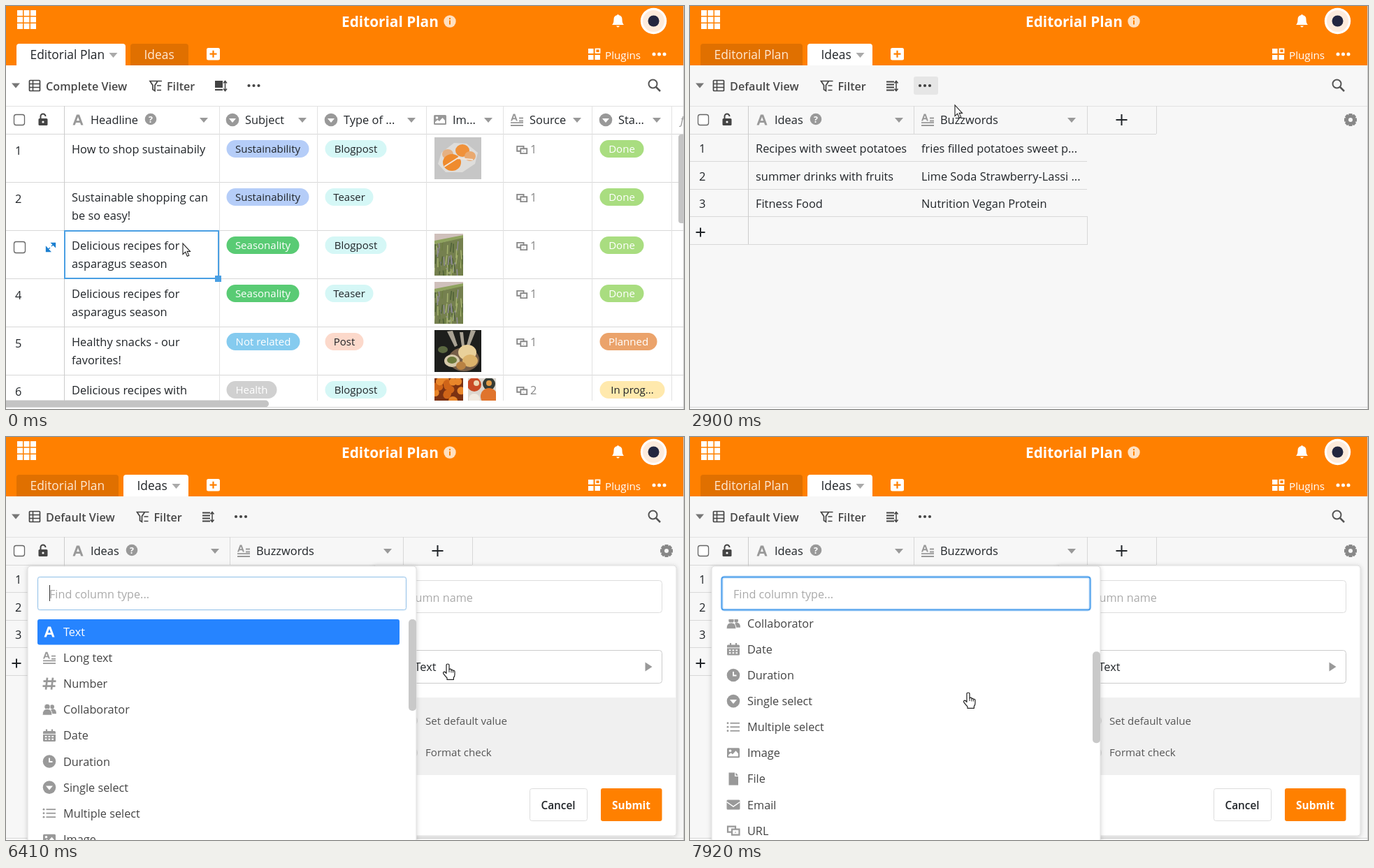
Recreate the animation shown at these times as an HTML page. Size 970 by 577 pixels, loop 8 s.

```html
<!DOCTYPE html>
<html lang="en">
<head>
<meta charset="utf-8">
<title>Editorial Plan</title>
<style>
html, body { margin: 0; width: 100%; height: 100%; overflow: hidden; background: #fff; }
svg { display: block; }
#stage { width: 970px; height: 577px; font-family: "Open Sans", "Noto Sans", sans-serif; }
</style>
</head>
<body>
<script>
const LOOP = 8000, INK = '#212529', GREY = '#999', LINE = '#d8d8d8', ORANGE = '#ff8000';

// Drawing helpers, each returning SVG markup
const text = (x, y, s, size = 16.4, fill = INK, attrs = '') =>
  `<text x="${x}" y="${y}" font-size="${size}" fill="${fill}" ${attrs}>${s}</text>`;
const rect = (x, y, w, h, fill, r = 0, attrs = '') =>
  `<rect x="${x}" y="${y}" width="${w}" height="${h}" fill="${fill}" rx="${r}" ${attrs}/>`;
const box = (x, y, w, h, stroke, r = 0, fill = 'none', width = 1) =>
  rect(x + .5, y + .5, w, h, fill, r, `stroke="${stroke}" stroke-width="${width}"`);
const circle = (x, y, r, fill) => `<circle cx="${x}" cy="${y}" r="${r}" fill="${fill}"/>`;
const oval = (x, y, rx, ry, fill) => `<ellipse cx="${x}" cy="${y}" rx="${rx}" ry="${ry}" fill="${fill}"/>`;
const path = (d, fill = 'none', attrs = '') => `<path d="${d}" fill="${fill}" ${attrs}/>`;
const stroke = (d, color, width = 1, attrs = '') =>
  path(d, 'none', `stroke="${color}" stroke-width="${width}" ${attrs}`);
const hline = (x, y, w, c = LINE) => rect(x, y, w, 1, c);
const vline = (x, y, h, c = LINE) => rect(x, y, 1, h, c);
const group = (id, body, attrs = '') => `<g id="${id}" ${attrs}>${body}</g>`;
const caret = (x, y, c = GREY) => path(`M${x - 6} ${y - 3.5}h12l-6 7z`, c);
const dots = (x, y, c, r, gap) => [-gap, 0, gap].map(d => circle(x + d, y, r, c)).join('');
const plus = (x, y, r, c, w) => stroke(`M${x - r} ${y}h${2 * r}M${x} ${y - r}v${2 * r}`, c, w);
const times = (n, f) => Array.from({ length: n }, (_, i) => f(i)).join('');
const random = n => Math.abs(Math.sin(n * 12.9898) * 43758.5453) % 1;
const letterA = 'M-7.5 7.5-2-7.5h4l5.5 15h-3.2L3 4h-6l-1.3 3.5zM-2 1.3h4L0-4.2z';

const icons = {
  text: c => path(letterA, c, 'fill-rule="evenodd"'),
  long: c => path(letterA, c, 'fill-rule="evenodd" transform="translate(-4,-3.5) scale(.66)"') +
    stroke('M3-2.5h6M3 1.5h6M-9 4.2H9M-9 8H9', c, 1.8),
  number: c => stroke('M-3-8.5-5 8.5M5-8.5 3 8.5M-8.5-3.5h18M-9.5 3.5h18', c, 2.7),
  people: c => circle(4, -4, 3, c) + path('M1 6q0-7 4-7 5 0 5 7z', c) +
    `<g stroke="#fff" stroke-width="1">${circle(-3, -4, 4.2, c)}${path('M-10 8q0-9 7-9t7 9z', c)}</g>`,
  date: c => rect(-9, -6.5, 18, 15, c, 1.5) + stroke('M-4-9v4M4-9v4', c, 2.2) + hline(-9, -2.5, 18, '#fff') +
    times(6, i => rect(-6.2 + i % 3 * 4.8, .5 + (i > 2) * 3.8, 2.6, 2, '#fff')),
  clock: c => circle(0, 0, 9.3, c) + stroke('M0-5v5.5h4.5', '#fff', 1.8),
  select: c => circle(0, 0, 9.3, c) + path('M-5-2H5L0 4z', '#fff'),
  multi: c => times(3, i => circle(-8, i * 5.5 - 5.5, 1.4, c) + rect(-4.5, i * 5.5 - 6.4, 13.5, 1.8, c)),
  image: c => rect(-9, -7, 18, 14, c, 1.5) + circle(-4.5, -3, 1.8, '#fff') +
    path('M-7 5v-2l3.5-3 2.5 2L3.5-3 7 1v4z', '#fff'),
  file: c => path('M-6.5-9H2v5.5h5V9H-6.5z', c) + path('M3.3-9v4.3H7z', c),
  email: c => rect(-9.5, -7, 19, 14, c, 1.5) + stroke('M-9.5-4 0 2.5 9.5-4', '#fff', 1.5),
  link: c => stroke('M-3 2h-5v-8H3v3M8.5-2H-2v8H8.5zM3 2v1', c, 2.2)
};
const icon = (name, x, y, c = GREY, scale = 1) =>
  `<g transform="translate(${x},${y}) scale(${scale})">${icons[name](c)}</g>`;

const checkbox = (x, y, s = 15) => box(x, y, s, s, '#666', 3, '#fff', 1.3);
const help = (x, y) => circle(x, y, 8.3, GREY) +
  text(x, y + 4.5, '?', 12.5, '#fff', 'text-anchor="middle" font-weight="700"');
const lock = rect(46.5, 161, 13, 10, '#444', 1.5) + circle(53, 166, 1.6, '#fff') +
  stroke('M49.5 161v-3a3.5 3.5 0 0 1 7 0', '#444', 2);
const pill = (x, y, w, s, fill, color = INK) => rect(x, y, w, 25, fill, 12.5) +
  text(x + w / 2, y + 18, s, 15, color, 'text-anchor="middle"');

// Parts shared by both tables
function chrome() {
  return rect(0, 0, 970, 85, ORANGE) +
    times(9, i => rect(16 + i % 3 * 9.5, 6 + (i / 3 | 0) * 9.5, 8, 8, '#fff')) +
    text(480, 30, 'Editorial Plan', 20.8, '#fff', 'font-weight="700"') +
    circle(635, 22, 8.7, '#ffe0c0') + rect(634, 20.5, 2, 6, ORANGE) + circle(635, 18, 1.2, ORANGE) +
    path('M867 27q2.5-2 2.5-8 0-5 5-6 1-2.5 2 0 5 1 5 6 0 6 2.5 8zM873 28.5h5q-2.5 4-5 0z', '#fff') +
    circle(926.5, 21.5, 18.7, '#fff') + circle(926.5, 21.5, 15.5, '#fdebdc') + circle(926.5, 21.5, 8, '#23263f') +
    rect(287, 60, 19, 17.5, '#fff', 2.5) + plus(296.5, 68.7, 5, ORANGE, 2.2) +
    rect(833, 61, 7.5, 7, '#fff') + rect(833, 70, 7.5, 7, '#fff') + rect(842.5, 70, 7.5, 7, '#fff') +
    box(843, 61, 6, 5.5, '#fff', 0, 'none', 1.8) +
    text(857, 76, 'Plugins', 15.2, '#fff') + dots(934.5, 69, '#fff', 2.5, 7.5);
}

const windowEdge = hline(0, 574, 970, '#d5d5d5') + rect(0, 575, 970, 2, '#fff') + vline(969, 0, 577, '#c8c8c8');

function toolbar(view, dx, bg) {
  const x = 206 + dx;
  return rect(0, 85, 970, 492, bg) + caret(14, 114, '#777') +
    box(33, 106, 15, 15, '#444', 1, 'none', 1.7) + stroke('M33 111.5h16M33 116.5h16M38.5 106v16', '#444', 1.5) +
    text(57, 121, view, 16.2, '#484848', 'font-weight="600"') +
    stroke(`M${x} 107.5h11l-4 6v8l-3-2v-6zM${x + 12} 107.5h5M${x + 10} 114h6M${x + 10} 120.5h6`, '#444', 1.7) +
    text(x + 24, 121, 'Filter', 16.2, '#484848', 'font-weight="600"') +
    stroke(`M${x + 107.5} 108v13m-2.5-10.5 2.5-3 2.5 3m-5 8 2.5 3 2.5-3`, '#444', 1.5) +
    dots(x + 148.5, 114, '#444', 2.1, 7) +
    `<circle cx="925.5" cy="111.5" r="6" fill="none" stroke="#555" stroke-width="2"/>` +
    stroke('M930 116l6 6', '#555', 2.5) +
    hline(0, 143, 970, '#e2e2e2') + checkbox(11, 155) + lock;
}

const tabShape = (x, w, fill, attrs) => path(`M${x} 85V58q0-4 4-4h${w - 8}q4 0 4 4v27z`, fill, attrs);
const activeTab = (x, w, s) => tabShape(x, w, '#fff') +
  text(x + 19.5, 76, s, 17.4) + caret(x + w - 17.5, 70.5, '#aaa');
const idleTab = (x, w, s, id) => tabShape(x, w, '#e07000', `id="${id}"`) +
  text(x + 19.5, 76, s, 17.4, '#ffe9d2');

// Simplified food photos
const photo = (x, y, w, h, bg, body) =>
  `<svg x="${x}" y="${y}" width="${w}" height="${h}">${rect(0, 0, w, h, bg)}${body}</svg>`;
const fruit = (x, y) => photo(x, y, 67, 60, '#c6c6c6',
  path('M10 22 28 8 46 9 62 22 58 38 40 50 16 50 5 38z', '#dedddb') +
  oval(19, 24, 8, 7, '#e5b183') + oval(25, 36, 13, 12, '#ef8b2e') +
  oval(40, 19, 10, 9, '#f0913a') + oval(51, 27, 8, 7, '#e9a970') + stroke('M14 42l22-14M33 30l22 2', '#f3e6da', 2));
const asparagus = (x, y) => photo(x, y, 41, 60, '#75804f',
  times(60, i => {
    const tint = ['#a3b06e', '#4f6138', '#8d8a93', '#6d7d42'][i % 4];
    return stroke(`M${random(i + 1) * 41} ${8 + random(i + 70) * 45}l${random(i + 140) * 4 - 2} 13`, tint, 1.6);
  }) + path('M0 0h41v5L0 15z', '#cfc0bb') + path('M0 10 41 2v4L0 15z', '#8fa35f'));
const bowl = (x, y) => photo(x, y, 67, 60, '#1d1e1c',
  path('M18 2l11 22 4-2L26 1zM36 3l3 20h4L41 3zM52 0l-6 22 4 1 9-22z', '#a9a294') +
  oval(42, 42, 22, 17, '#775f49') + oval(25, 44, 11, 9, '#d6c9ab') + oval(25, 43, 7, 5, '#6d7a3c') +
  oval(47, 32, 13, 11, '#e9d09a') + oval(51, 44, 11, 9, '#dcb36c') + oval(38, 51, 7, 6, '#b98243') +
  oval(12, 28, 7, 5, '#5a6740'));
const nuggets = (x, y) => photo(x, y, 41, 44, '#7c3212',
  times(16, i => circle(random(i + 3) * 41, random(i + 40) * 40, 5.5, i % 2 ? '#e9862a' : '#cf6418')));
const platter = (x, y) => photo(x, y, 40, 44, '#dcd6ce',
  circle(9, 9, 10, '#c94a25') + circle(30, 8, 9, '#353b35') + circle(30, 26, 12, '#e0742c') +
  circle(9, 30, 8, '#f0eae0') + circle(30, 7, 4, '#e39b45') + circle(12, 7, 4, '#ecd6b4'));

function planTable() {
  const SKY = '#d5f7f6';
  const topics = {
    Sustainability: [118, '#b5cdf8'], Seasonality: [104, '#59cb74', '#fff'],
    'Not related': [105, '#85cbef', '#fff'], Health: [72, '#d0d0d0', '#fff'],
    Blogpost: [88, SKY], Teaser: [69, SKY], Post: [55, '#fcd9cb'],
    Done: [63, '#a9dd80', '#fff'], Planned: [82, '#eba36b', '#fff'], 'In prog...': [93, '#ffe9ad']
  };
  const tag = (x, y, name) => pill(x, y, topics[name][0], name, ...topics[name].slice(1));
  const recipes = ['Delicious recipes for', 'asparagus season'];
  const rows = [
    [['How to shop sustainabily'], 'Sustainability', 'Blogpost', 1, 'Done', y => fruit(613, y)],
    [['Sustainable shopping can', 'be so easy!'], 'Sustainability', 'Teaser', 1, 'Done', () => ''],
    [recipes, 'Seasonality', 'Blogpost', 1, 'Done', y => asparagus(613, y)],
    [recipes, 'Seasonality', 'Teaser', 1, 'Done', y => asparagus(613, y)],
    [['Healthy snacks - our', 'favorites!'], 'Not related', 'Post', 1, 'Planned', y => bowl(613, y)],
    [['Delicious recipes with'], 'Health', 'Blogpost', 2, 'In prog...', y => nuggets(613, y) + platter(661, y)]
  ];
  const heads = [
    ['text', 103, 'Headline', 283], ['select', 324, 'Subject', 424], ['select', 465, 'Type of ...', 580],
    ['image', 621, 'Im...', 690], ['long', 731, 'Source', 817], ['select', 858, 'Sta...', 931]
  ];
  return toolbar('Complete View', 0, '#fff') + rect(299, 107, 11, 10, '#444') + rect(299, 119, 11, 2, '#444') +
    group('filterHover', rect(198, 101, 80, 27, '#000', 3, 'opacity=".07"')) +
    activeTab(15, 156, 'Editorial Plan') + idleTab(178, 83, 'Ideas', 'ideasTab') +
    heads.map(([kind, x, s, end]) => icon(kind, x, 163) + text(x + 18, 169, s) + caret(end, 163.5)).join('') +
    help(207, 162) + text(963, 169, 'ƒ', 17, GREY, 'font-style="italic"') +
    times(6, i => hline(0, 183 + i * 69, 970)) +
    [83, 305, 445, 601, 711, 838, 952].map((x, i) => vline(x, 143, 434, i ? '#e2e2e2' : '#ccc')).join('') +
    rows.map(([lines, subject, type, count, status, photos], i) => {
      const y = 183 + i * 69;
      return text(13, y + 30, i + 1) + lines.map((s, n) => text(94, y + 28 + n * 26, s)).join('') +
        tag(315.5, y + 9, subject) + tag(456.5, y + 9, type) + tag(849.5, y + 9, status) +
        icon('link', 738, y + 23, '#888', .85) + text(750, y + 28, count, 16.4, '#888') + photos(y + 5);
    }).join('') +
    group('rowHover', rect(8, 188, 70, 55, '#fff') + checkbox(11, 199, 16) +
      path('M65 206l5-5M65 201.5h5.5v5.5zM63 208l-5 5M57.5 207v6.5h6z', '#1b7fd0', 'stroke="#1b7fd0" stroke-width="1.3"')) +
    box(83.5, 321.5, 220, 68, '#4a9fe3', 0, 'none', 2) + rect(299, 386, 9, 9, '#4a9fe3') +
    rect(0, 565, 970, 12, '#fff') + rect(-6, 564.5, 382, 10, '#c4c4c4', 5) +
    rect(962, 184, 10, 127, '#c4c4c4', 4);
}

function ideasTable() {
  const rows = [
    ['Recipes with sweet potatoes', 'fries filled potatoes sweet p...'],
    ['summer drinks with fruits', 'Lime Soda Strawberry-Lassi ...'],
    ['Fitness Food', 'Nutrition Vegan Protein']
  ];
  return rect(0, 53, 280, 32, ORANGE) + toolbar('Default View', -18.5, '#f7f7f7') +
    stroke('M281 108.5h11M281 112.5h11M281 116.5h11M281 120.5h11', '#444', 1.8) +
    group('moreHover', rect(320, 101, 35, 26, '#000', 3, 'opacity=".07"')) +
    idleTab(15, 146, 'Editorial Plan', 'planTab') + activeTab(168, 93, 'Ideas') +
    icon('text', 103, 163) + text(121, 169, 'Ideas') + help(180, 162) + caret(299, 163.5) +
    icon('long', 340, 163) + text(358, 169, 'Buzzwords') + caret(546, 163.5) +
    plus(617.5, 163, 8, INK, 2) + hline(0, 183, 667) + vline(320, 143, 40) + vline(568, 143, 40) + vline(667, 143, 40) +
    times(8, i => rect(942.5, 154, 5, 18, '#888', 1, `transform="rotate(${i * 45} 945 163)"`)) +
    circle(945, 163, 7, '#888') + circle(945, 163, 3, '#f7f7f7') +
    rows.map(([idea, words], i) => {
      const y = 210 + Math.round(i * 39.5);
      return text(13, y, i + 1) + text(94, y, idea) + text(331, y, words);
    }).join('') +
    [222, 262, 301, 341].map(y => hline(0, y, 568)).join('') + vline(83, 143, 198, '#ccc') + vline(568, 301, 41) +
    plus(15, 324, 6.5, INK, 2) +
    group('ideaHover', rect(8, 190, 30, 28, '#f7f7f7') + checkbox(11, 196, 16)) +
    group('tooltip', box(627, 189, 110, 31, '#666', 0, '#fff') + text(637, 209.5, 'Insert column', 13.8, '#444'));
}

const shadowed = 'filter="url(#shadow)"';
const focusRing = (id, x, y, w, h) => group(id,
  box(x, y, w, h, '#cfe5fa', 4, 'none', 4.5) + box(x, y, w, h, '#2f8fe8', 3, 'none', 1.4));

function columnForm() {
  const toggle = y => rect(562, y, 27, 14, '#d4d4d4', 7) + circle(569, y + 7, 5, '#fff');
  return rect(525, 184, 434, 387, '#fff', 4, `${shadowed} stroke="#ddd"`) +
    box(545, 205, 393, 46, '#ddd', 4, '#fff') + focusRing('nameFocus', 545, 205, 393, 46) +
    text(561.5, 236, 'Column name', 16.2, '#aaa') + group('nameCaret', vline(562, 218, 22, '#333')) +
    text(545, 285, 'Type') + box(545, 305, 393, 47, '#ccc', 4, '#fff') +
    icon('text', 569, 329) + text(584.5, 335, 'Text', 16.3) + path('M914.5 322.5v13l10-6.5z', GREY) +
    rect(525, 373, 433, 111, '#f0f0f0') + toggle(399) + toggle(445) +
    text(600, 412, 'Set default value', 15.1, '#555') + text(600, 457, 'Format check', 15.1, '#555') +
    box(749, 503, 82, 46, '#ddd', 3, '#fff') + rect(851, 503, 87.5, 47, ORANGE, 3) +
    text(790, 533, 'Cancel', 15.4, INK, 'text-anchor="middle" font-weight="600"') +
    text(894.5, 533, 'Submit', 15.4, '#fff', 'text-anchor="middle" font-weight="700"');
}

function typeList() {
  const types = [
    ['text', 'Text'], ['long', 'Long text'], ['number', 'Number'], ['people', 'Collaborator'], ['date', 'Date'],
    ['clock', 'Duration'], ['select', 'Single select'], ['multi', 'Multiple select'], ['image', 'Image'],
    ['file', 'File'], ['email', 'Email'], ['link', 'URL']
  ];
  const items = types.map(([kind, s], i) => {
    const y = 279 + i * 37.1;
    return icon(kind, 62, y, i ? GREY : '#fff') + text(82, y + 6, s, 16.3, i ? '#444' : '#fff');
  }).join('');
  return rect(31, 185, 556, 420, '#fff', 4, `${shadowed} stroke="#ddd"`) +
    box(45, 200, 527, 47, '#a9cdea', 3, '#fff') + focusRing('findFocus', 45, 200, 527, 47) +
    text(62, 231, 'Find column type...', 16.2, '#aaa') + group('findCaret', vline(62, 212, 23, '#333')) +
    `<g clip-path="url(#listClip)">${group('items',
      rect(45, 261, 518, 36.5, '#2684ff', 3) + group('itemHover', rect(45, 261, 518, 36.5, '#ededed', 3)) + items)}</g>` +
    group('thumb', rect(576, 261, 11, 131, '#c9c9c9', 5));
}

const cursors =
  group('arrow', path('M0 0V15.5l3.7-3.3 2.6 6 2.5-1.1-2.6-5.7H10.5z', '#fff', 'stroke="#222" stroke-width="1.1"')) +
  group('hand', path('M-2 2Q-2 0 0 0T2 2V8Q2.3 7 3.8 7.2T5 8.8Q6.5 7.6 7.6 9.4Q9.8 8.8 10 11V15Q10 18 8.4 19.5V22.3' +
    'H-1V20Q-3.5 17.5-6.3 13.6Q-7 11.6-4.9 11.2Q-3.2 11.6-2 13.5Z', '#fff', 'stroke="#222" stroke-width="1.2" stroke-linejoin="round"') +
    stroke('M2 8v4M5 9v3.5M7.6 9.5v3', '#222', 1));

document.body.innerHTML = `<svg id="stage" viewBox="0 0 970 577"><defs>
  <filter id="shadow" x="-5%" y="-5%" width="110%" height="110%">
    <feDropShadow dx="0" dy="1" stdDeviation="3" flood-opacity=".18"/></filter>
  <clipPath id="listClip"><rect x="31" y="261" width="545" height="316"/></clipPath></defs>` +
  chrome() + group('plan', planTable()) + group('ideas', ideasTable()) + windowEdge +
  group('form', columnForm()) + group('list', typeList()) + cursors + '</svg>';

// Stepped tracks: [start time, value...]; the last started step holds
const pointer = [
  [0, 253, 340, 'arrow'], [150, 242, 300, 'arrow'], [300, 232, 256, 'arrow'], [450, 232, 200, 'arrow'],
  [570, 237, 137, 'arrow'], [720, 229, 91, 'hand'], [870, 214, 78, 'hand'], [1020, 214, 72.5, 'hand'],
  [1270, 214, 74, 'hand'], [1640, 214, 74, 'arrow'], [2390, 236, 77, 'hand'], [2510, 257, 83, 'hand'],
  [2660, 295, 103, 'arrow'], [2780, 336, 122, 'arrow'], [2900, 379, 142, 'arrow'], [3020, 428, 154, 'arrow'],
  [3180, 547, 193, 'arrow'], [3330, 584, 194, 'arrow'], [3450, 604, 183, 'arrow'], [3570, 614, 175, 'hand'],
  [3690, 617, 172.5, 'hand'], [5480, 621, 212, 'arrow'], [5600, 626, 258, 'arrow'], [5750, 627, 296, 'arrow'],
  [5900, 630, 313, 'hand'], [6020, 631, 320, 'hand'], [6140, 632, 324, 'hand'], [6260, 632, 325, 'hand'],
  [6840, 587, 320, 'arrow'], [6990, 530, 327, 'hand'], [7110, 470, 339, 'hand'], [7230, 448, 345.5, 'hand'],
  [7380, 398, 366, 'hand']
];
const hoveredRow = [[0, 2], [150, 1], [450, 0], [570, -1]];
const hoveredItem = [[0, -1], [6990, 1], [7110, 2], [7530, -1]];
const formOpacity = [[0, 0], [4840, .4], [4960, .85], [5080, 1]];
const nameGlow = [[0, 1], [5900, .7], [6020, .4], [6140, .15], [6260, 0]];
const findGlow = [[0, 0], [6410, .1], [6530, 1]];
const scroll = [[0, 0], [7530, 42], [7650, 100], [7770, 123.5]];

const at = (track, t) => track.findLast(step => step[0] <= t).slice(1);
const $ = id => document.getElementById(id);
const show = (id, on) => $(id).style.display = on ? '' : 'none';
const move = (id, x, y) => $(id).setAttribute('transform', `translate(${x},${y})`);
const fade = (id, v) => $(id).style.opacity = v;
const during = (t, from, to) => t >= from && t < to;
const blink = (t, from) => t >= from && Math.floor((t - from) / 530) % 2 === 0;

function render(t) {
  show('plan', t < 1640);
  show('ideas', t >= 1640);
  show('list', t >= 6410);
  const [row] = at(hoveredRow, t), [item] = at(hoveredItem, t), [offset] = at(scroll, t);
  show('rowHover', row >= 0);
  move('rowHover', 0, row * 69);
  show('filterHover', during(t, 720, 870));
  $('ideasTab').setAttribute('fill', t >= 870 ? '#d66b00' : '#e07000');
  show('moreHover', during(t, 2780, 3020));
  show('ideaHover', during(t, 3180, 3450));
  show('tooltip', during(t, 4280, 4840));
  fade('form', at(formOpacity, t));
  fade('nameFocus', at(nameGlow, t));
  show('nameCaret', t < 5900 && blink(t, 5080));
  fade('findFocus', at(findGlow, t));
  show('findCaret', blink(t, 6410) && t < 7920);
  show('itemHover', item >= 0);
  move('itemHover', 0, item * 37.1);
  move('items', 0, -offset);
  move('thumb', 0, offset * .375);
  const [x, y, shape] = at(pointer, t);
  for (const id of ['arrow', 'hand']) {
    show(id, id === shape);
    move(id, x, y);
  }
}

const start = performance.now();
function tick() {
  render((performance.now() - start) % LOOP);
  requestAnimationFrame(tick);
}
tick();
</script>
</body>
</html>
```
